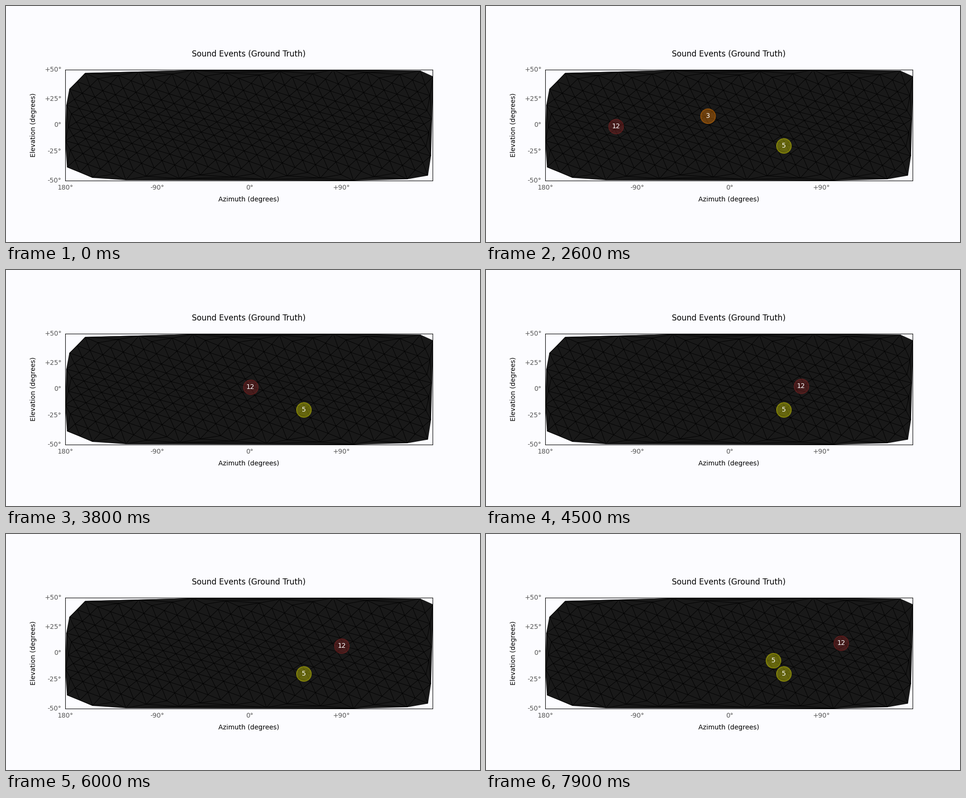
A matplotlib script that plays this animation: 1000 px wide and 500 px high, repeating every 8 s.

```python
import numpy as np
import matplotlib.pyplot as plt
from matplotlib.animation import FuncAnimation
from matplotlib.colors import ListedColormap
from matplotlib.tri import Triangulation

STEPS, STEP_MS = 80, 100
PAPER = "#fcfcff"
MUTED = "#555555"
MAX_EL = 50
WEST, EAST = np.radians([-180, 179])


def miller(az, el):
    """Miller map projection, degrees in, radians out."""
    lat = np.radians(el)
    return np.radians(az), 1.25 * np.log(np.tan(np.pi / 4 + 0.4 * lat))


def sphere_grid(order=10):
    """Fibonacci directions on the sphere, cut to the elevation band."""
    count = 4 * (order + 1) ** 2
    n = np.arange(count)
    el = np.degrees(np.arcsin(1 - (2 * n + 1) / count))
    az = np.degrees(4 * np.pi * n / (1 + np.sqrt(5)))
    az = (az + 180) % 360 - 180
    keep = np.abs(el) < MAX_EL
    return az[keep], el[keep]


fig = plt.figure(figsize=(10, 5), dpi=100, facecolor=PAPER)
ax = fig.add_subplot(facecolor=PAPER)
top = miller(0, MAX_EL)[1]
ax.set(xlim=(WEST, EAST), ylim=(-top, top), xticks=[], yticks=[], aspect="equal")
ax.set_title("Sound Events (Ground Truth)", fontsize=12, pad=20)
ax.set_xlabel("Azimuth (degrees)", labelpad=23.5)
ax.set_ylabel("Elevation (degrees)", labelpad=43.5)

# Translucent shading: neighbouring triangles overlap and leave dark seams.
mesh = Triangulation(*miller(*sphere_grid()))
ax.tripcolor(mesh, np.ones(mesh.x.size), cmap=ListedColormap(["black"]),
             shading="gouraud", alpha=0.9)

gap = (EAST - WEST) / 100
for el in range(-50, 51, 25):
    label = f"{el:+d}°" if el else "0°"
    ax.text(WEST - gap, miller(0, el)[1], label, ha="right", va="center", color=MUTED)
for az, label in ((-180, "180°"), (-90, "-90°"), (0, "0°"), (90, "+90°")):
    ax.text(np.radians(az), -top - gap, label, ha="center", va="top", color=MUTED)


def still(az, el):
    return lambda t: (az, el)


def walk_past(t):
    """Slow drift in azimuth with one quick swing across the front."""
    az = t - 54.5 + 84.5 * np.tanh((t - 37) / 4.68)
    el = np.interp(t, [21, 30, 38, 53, 68, 79], [-4, 1, 2, 5, 9, 10])
    return az, el


def cross_left(t):
    """Steady sweep to the left that sinks at the end."""
    return -70 - 12.2 * (t - 30), 9 - 0.5 * max(0, t - 30) ** 2


class Event:
    """A numbered marker shown from start to end along path(step)."""

    def __init__(self, name, color, start, end, path):
        self.start, self.end, self.path = start, end, path
        self.dot = ax.scatter([0], [0], s=500, color=color, alpha=0.4,
                              linewidth=1.5, zorder=3)
        self.text = ax.text(0, 0, name, color="white", ha="center", va="center", zorder=4)

    def update(self, step):
        pos = miller(*np.round(self.path(step)))
        self.dot.set_offsets([pos])
        self.text.set_position(pos)
        for part in (self.dot, self.text):
            part.set_visible(self.start <= step < self.end)
        return self.dot, self.text


events = [
    Event("5", "#d8d800", 8, STEPS, still(53, -20)),
    Event("12", "#8c2424", 21, STEPS, walk_past),
    Event("3", "#ec7c00", 26, 36, cross_left),
    Event("5", "#d8d800", 72, STEPS, still(43, -7)),
]


def draw(step):
    return [part for event in events for part in event.update(min(step, STEPS - 1))]


anim = FuncAnimation(fig, draw, frames=STEPS, interval=STEP_MS, repeat=True,
                     repeat_delay=0, blit=False)
plt.show()
```
